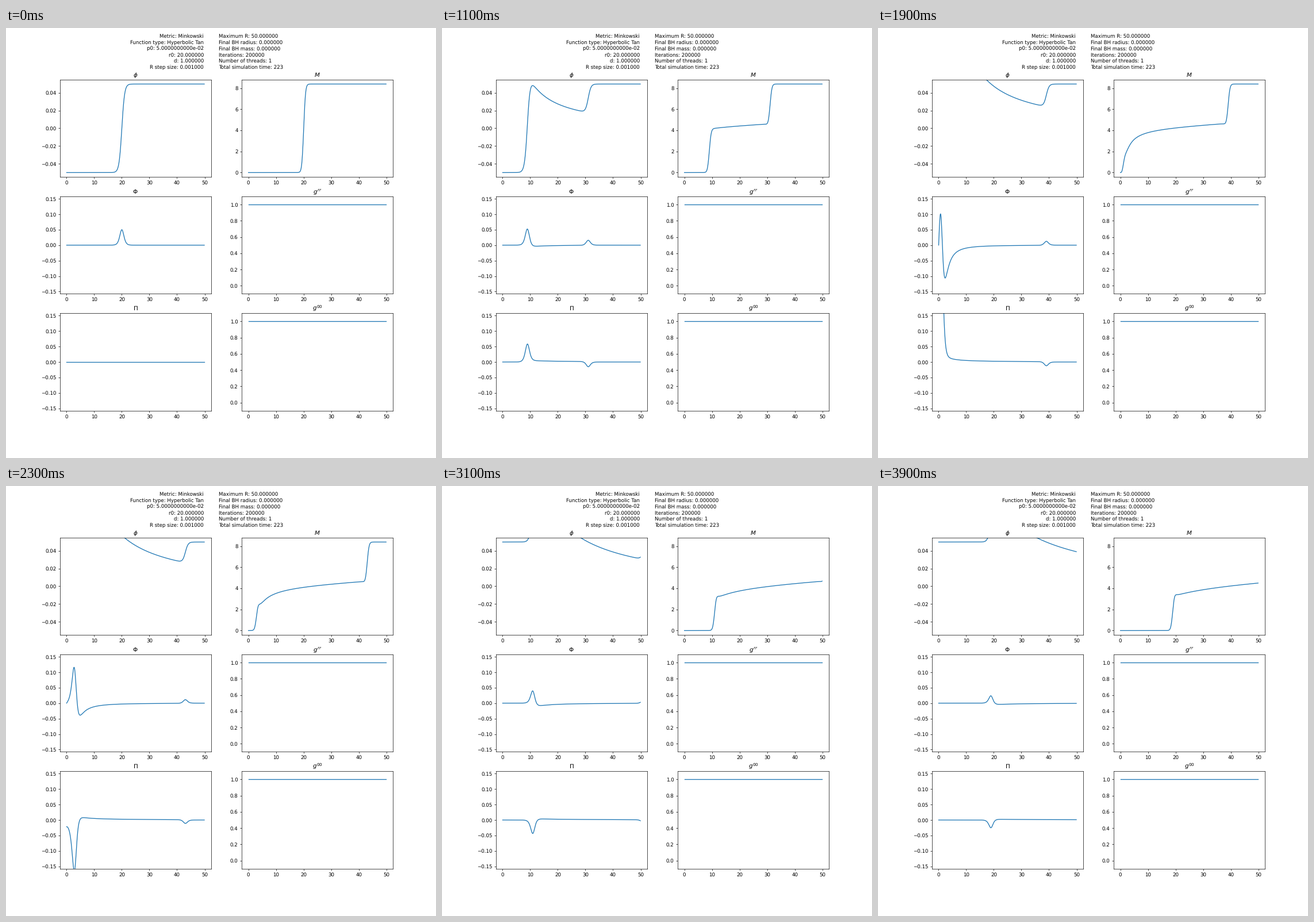
A matplotlib script for the animation above (4 s loop, 748x748 px).

```python
import numpy as np
import matplotlib.pyplot as plt
from matplotlib.animation import FuncAnimation

plt.rcParams["text.hinting"] = "none"

SIZE = 748
FRAMES = 40
P0, R0, D = 0.05, 20.0, 1.0

LEFT = [
    "Metric: Minkowski",
    "Function type: Hyperbolic Tan",
    "p0: 5.0000000000e-02",
    "r0: 20.000000",
    "d: 1.000000",
    "R step size: 0.001000",
]
RIGHT = [
    "Maximum R: 50.000000",
    "Final BH radius: 0.000000",
    "Final BH mass: 0.000000",
    "Iterations: 200000",
    "Number of threads: 1",
    "Total simulation time: 223",
]

r = np.arange(0, 50, 0.1)
r[0] = 1e-4  # keeps the 1/r terms finite at the centre


def u0(x):
    """Initial r * phi, extended as an odd function."""
    return P0 * x * np.tanh((np.abs(x) - R0) / D)


def du0(x):
    s = np.tanh((np.abs(x) - R0) / D)
    return P0 * (s + np.abs(x) / D * (1 - s**2))


def fields(t):
    """Spherical wave in flat space: phi, its r and t derivatives, and the mass."""
    phi = (u0(r + t) + u0(r - t)) / (2 * r)
    grad = (du0(r + t) + du0(r - t)) / (2 * r) - phi / r
    pi = (du0(r + t) - du0(r - t)) / (2 * r)
    density = 2 * np.pi * r**2 * (grad**2 + pi**2)
    steps = (density[1:] + density[:-1]) / 2 * np.diff(r)
    mass = np.concatenate([[0], np.cumsum(steps)])
    return phi, grad, pi, mass


fig, axes = plt.subplots(3, 2, figsize=(12, 12), dpi=SIZE / 12)
fig.subplots_adjust(left=0.125, right=0.9, bottom=0.11, top=0.88,
                    wspace=0.2, hspace=0.2)

for i, (a, b) in enumerate(zip(LEFT, RIGHT)):
    y = 1 - (17 + 10.8 * i) / SIZE
    fig.text(0.46, y, a, ha="right", va="baseline", fontsize=10)
    fig.text(0.495, y, b, ha="left", va="baseline", fontsize=10)


def panel(ax, title, values, ylim=None):
    line, = ax.plot(r, values, color="#1f77b4", lw=1.5)
    ax.set_title(title)
    if ylim:
        ax.set_ylim(*ylim)
    return line


phi, grad, pi, mass = fields(0)
ones = np.ones_like(r)
lines = [
    panel(axes[0, 0], r"$\phi$", phi),
    panel(axes[1, 0], r"$\Phi$", grad, (-0.1575, 0.1575)),
    panel(axes[2, 0], r"$\Pi$", pi, (-0.1575, 0.1575)),
    panel(axes[0, 1], "$M$", mass),
]
panel(axes[1, 1], "$g^{rr}$", ones, (-0.1, 1.1))
panel(axes[2, 1], "$g^{00}$", ones, (-0.1, 1.1))

# Limits stay as set by the initial data.
for ax in axes.flat:
    ax.set_xlim(ax.get_xlim())
    ax.set_ylim(ax.get_ylim())


def update(frame):
    for line, values in zip(lines, fields(float(frame))):
        line.set_ydata(values)
    return lines


anim = FuncAnimation(fig, update, frames=FRAMES, interval=100, repeat=True,
                     repeat_delay=0, blit=False)
plt.show()
```
